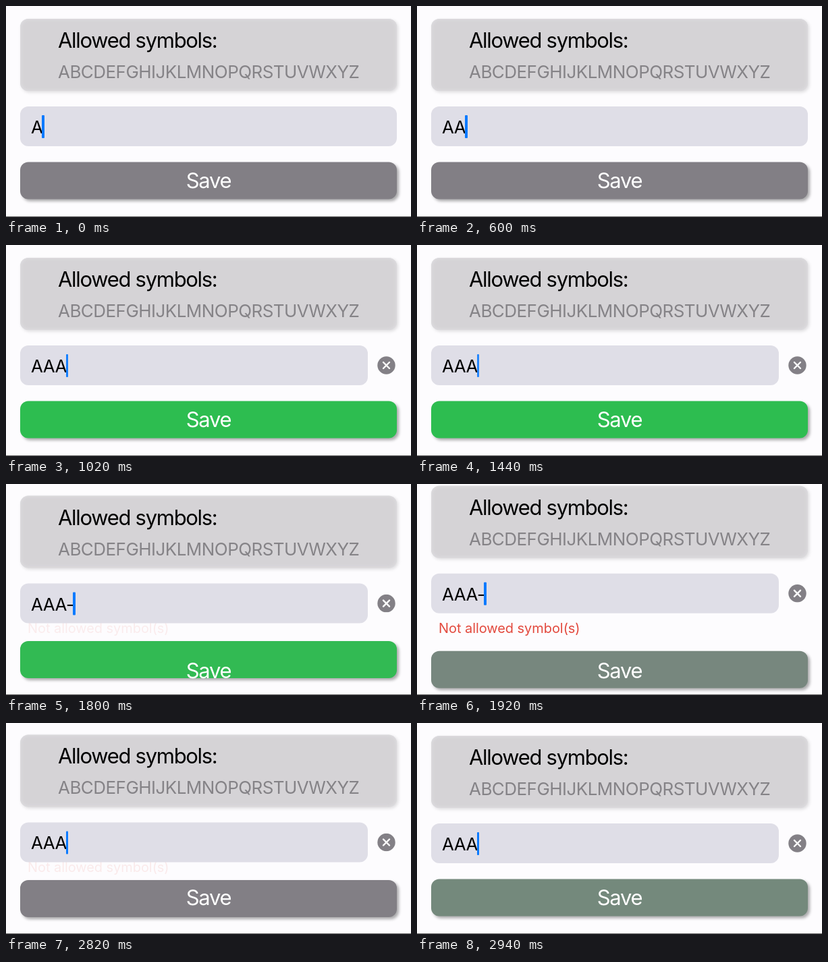
An HTML page that plays this animation: 600x313 px, repeating every 3000 ms.

```html
<!DOCTYPE html>
<html lang="en">
<head>
<meta charset="utf-8">
<style>
  html, body { margin: 0; width: 100%; height: 100%; overflow: hidden; background: #fdfcfe; }
  #stage { position: relative; width: 600px; height: 313px; overflow: hidden; font-family: Inter, sans-serif; white-space: pre; }
  #stage div, svg { position: absolute; }
  #panel, #field, #button { left: 21px; width: 558px; border-radius: 12px; }
  #form { inset: 0; }
  #panel { top: 19px; height: 107px; background: #d5d3d6; box-shadow: 2px 2px 5px #0002, inset 0 0 5px 1px #dfdee1; }
  #title, #save { font-size: 31px; line-height: 38px; letter-spacing: -.042em; }
  #title { left: 56px; top: 13px; }
  #symbols, #text { font-size: 26px; line-height: 32px; letter-spacing: -.021em; }
  #symbols { left: 56px; top: 63px; color: #858387; }
  #field { top: 149px; height: 59px; background: #dfdee7; }
  #text { left: 16px; top: 15px; }
  #caret { left: 100%; margin-left: -1px; top: -2px; width: 3.5px; height: 34px; border-radius: 1px; background: #0a7aff; }
  #clear { left: 550px; top: 165px; }
  #error { left: 32px; top: 202px; font-size: 20px; line-height: 24px; letter-spacing: -.003em; color: #e0372a; }
  #button { top: 0; height: 55px; box-shadow: 3px 3px 4px #0005; }
  #save { left: 21px; width: 558px; text-align: center; color: #fff; }
  #line { left: 0; top: 312px; width: 600px; height: 1px; background: #666; }
</style>
</head>
<body>
<div id="stage">
  <div id="error">Not allowed symbol(s)</div>
  <div id="form">
    <div id="panel">
      <div id="title">Allowed symbols:</div>
      <div id="symbols">ABCDEFGHIJKLMNOPQRSTUVWXYZ</div>
    </div>
    <div id="field"><div id="text"><span id="value"></span><div id="caret"></div></div></div>
    <svg id="clear" width="27" height="27">
      <circle cx="13.5" cy="13.5" r="13.2" fill="#838086"/>
      <path d="M9 9l9 9m0-9l-9 9" stroke="#fff" stroke-width="2.4" stroke-linecap="round"/>
    </svg>
  </div>
  <div id="button"></div>
  <div id="save">Save</div>
  <div id="line"></div>
</div>
<script>
const LOOP = 3000, DURATION = 190;
const GREY = [130, 127, 133], GREEN = [45, 189, 80];
// [time, field text]; the first key is pressed before the loop begins
const KEYS = [[-360, 'A'], [475, 'AA'], [635, 'AAA'], [1740, 'AAA-'], [2650, 'AAA']];
const $ = id => document.getElementById(id);

const ramp = (t, start, length) => Math.min(1, Math.max(0, (t - start) / length));
function ease(t, start) {
  const p = ramp(t, start, DURATION);
  return p * p * (3 - 2 * p);
}

// The caret stays solid after a key press, then blinks
function caretOpacity(age) {
  const phase = age < 380 ? 0 : (age - 380) % 660;
  return 1 - ramp(phase, 0, 100) + ramp(phase, 320, 120);
}

function draw(t) {
  const [pressed, value] = KEYS.findLast(([time]) => time <= t);
  const filled = ease(t, 647);
  const invalid = ease(t, 1768) - ease(t, 2665);
  const green = filled - ease(t, 1774) + ease(t, 2892);
  const rgb = GREY.map((c, i) => c + (GREEN[i] - c) * green);

  $('value').textContent = value;
  $('caret').style.opacity = caretOpacity(t - pressed);
  $('field').style.width = 558 - 43 * filled + 'px';
  $('clear').style.opacity = filled;
  $('form').style.transform = `translateY(${-18 * invalid}px)`;
  $('error').style.opacity = invalid;
  $('button').style.transform = `translateY(${231.5 + 18 * invalid}px)`;
  $('button').style.background = `rgb(${rgb})`;
  $('save').style.top = (t >= 1768 && t < 2665 ? 258 : 240) + 'px';
}

function frame() {
  draw(performance.now() % LOOP);
  requestAnimationFrame(frame);
}
frame();
</script>
</body>
</html>
```
